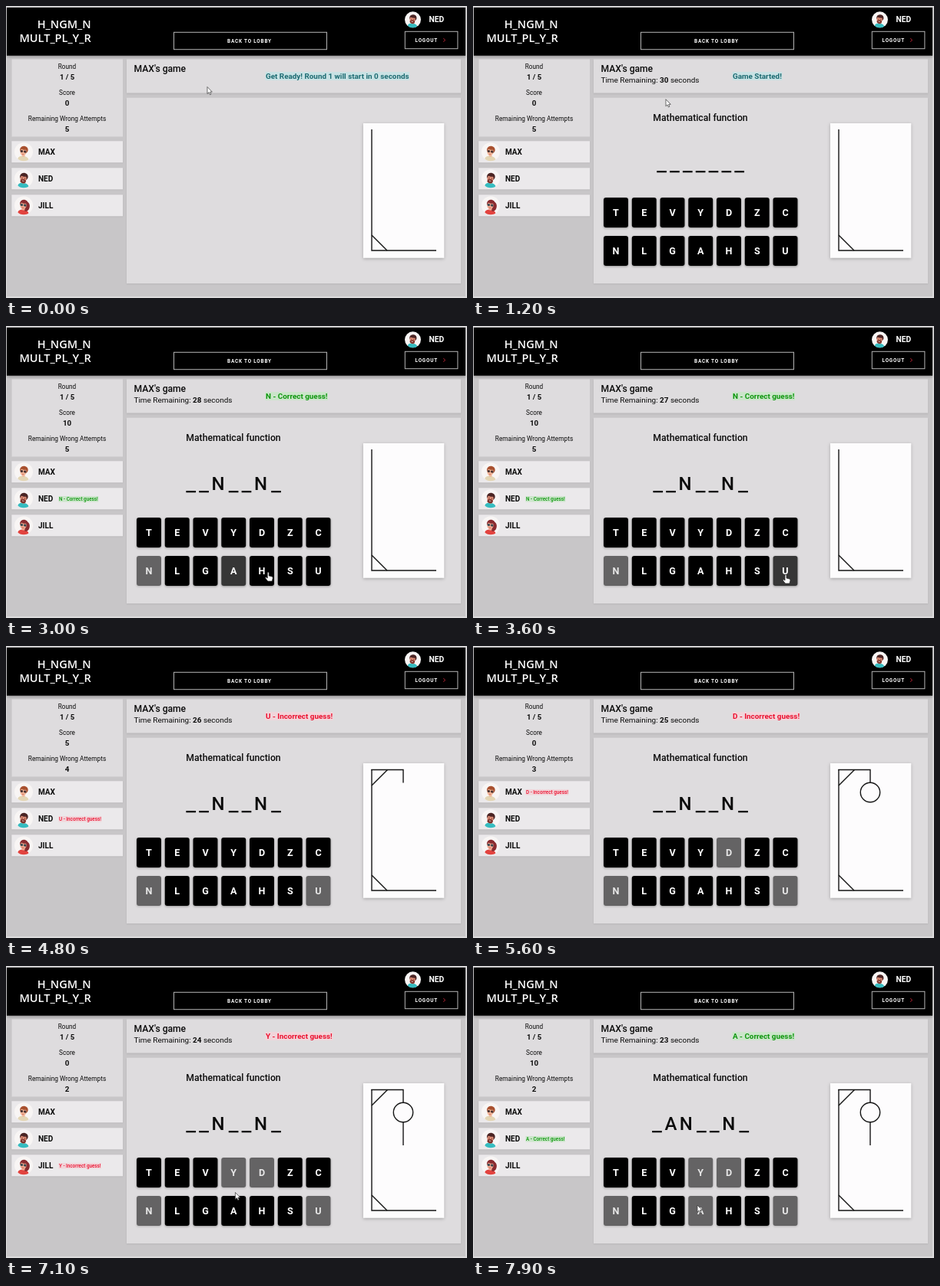
An HTML page with a canvas that plays this animation: 600 by 381 pixels, repeating every 8000 ms.

```html
<!DOCTYPE html>
<html lang="en">
<head>
<meta charset="utf-8">
<title>Word game</title>
<style>
  html, body { margin: 0; width: 100%; height: 100%; overflow: hidden; background: #c8c6c8; }
  canvas, svg { position: absolute; left: 0; top: 0; width: 600px; height: 381px; }
  text { font-family: Roboto, Arial, sans-serif; white-space: pre; }
</style>
</head>
<body>
<canvas id="stage" width="600" height="381"></canvas>
<svg id="labels" viewBox="0 0 600 381"></svg>
<script>
const ctx = document.getElementById('stage').getContext('2d');
const svg = document.getElementById('labels');
const LOOP = 8, START = 0.55;
const PANEL = '#dedcde';
const PLAYERS = ['MAX', 'NED', 'JILL'];
const KEYS = [...'TEVYDZCNLGAHSU'];
const ANSWER = 'TANGENT';
const TONES = {
  info: ['#1b6a71', '#c9e2e4'],
  good: ['#0c960c', '#cbe5ca'],
  bad: ['#ec0f2e', '#f1d5da']
};
// time, letter, player, correct
const GUESSES = [
  [2.3, 'N', 1, true],
  [3.9, 'U', 1, false],
  [5.2, 'D', 0, false],
  [6.3, 'Y', 2, false],
  [7.5, 'A', 1, true]
];
const PATHS = [
  [[0, 262, 105.5], [0.6, 262, 105.5], [1.2, 251, 121.5], [1.8, 241, 246], [2.15, 187, 322],
   [2.5, 187, 322], [3, 341, 321], [3.25, 407, 324], [4.4, 407, 324]],
  [[6.8, 318, 245], [7.2, 292, 312], [8, 292, 312]]
];

const clamp = v => Math.max(0, Math.min(1, v));
const lerp = (a, b, k) => a + (b - a) * k;

// ---------- text ----------
function make(tag, attrs) {
  const el = document.createElementNS('http://www.w3.org/2000/svg', tag);
  for (const k in attrs) el.setAttribute(k, attrs[k]);
  svg.appendChild(el);
  return el;
}

function label(x, y, size, str = '', weight = 400, anchor = 'start', fill = '#0b0b0b') {
  const el = make('text', { x, y, 'font-size': size, 'font-weight': weight, 'text-anchor': anchor, fill });
  el.textContent = str;
  return el;
}

function put(el, str) {
  if (el.textContent !== str) el.textContent = str;
}

for (const [y, str] of [[29, 'H_NGM_N'], [47.2, 'MULT_PL_Y_R']]) {
  label(110.7, y, 14.5, str, 600, 'end', '#fff').style.fontFamily = '"Open Sans", sans-serif';
}
label(288, 47.7, 6.4, 'BACK TO LOBBY', 700, 'start', '#fff').setAttribute('letter-spacing', 0.8);
label(532.6, 46.5, 6.4, 'LOGOUT', 700, 'start', '#fff').setAttribute('letter-spacing', 0.8);
label(550.5, 21, 10.3, PLAYERS[1], 700, 'start', '#fff');
label(79.5, 82.4, 8.2, 'Round', 400, 'middle');
label(79.5, 96, 9.5, '1 / 5', 700, 'middle');
label(79.5, 116.4, 8.2, 'Score', 400, 'middle');
const score = label(79.5, 130, 9.8, '0', 700, 'middle');
label(79.5, 149.7, 8.3, 'Remaining Wrong Attempts', 400, 'middle');
const lives = label(79.5, 163.7, 9.8, '5', 700, 'middle');
PLAYERS.forEach((name, i) => label(42, 193.6 + 35 * i, 10, name, 700));
label(166.5, 86.4, 12.1, PLAYERS[0] + "'s game", 500);

const timer = label(166.5, 100, 9.95);
timer.append('Time Remaining: ');
const secs = document.createElementNS(timer.namespaceURI, 'tspan');
secs.setAttribute('font-weight', 700);
timer.append(secs, ' seconds');

const notice = label(338, 95, 9.9, '', 600);
const tag = label(69, 0, 6.3, '', 500);
const hint = label(296, 149.6, 12.2, 'Mathematical function', 500, 'middle');
const keyX = i => 170 + 36.75 * (i % 7);
const keyY = i => i < 7 ? 250 : 300;
const caps = KEYS.map((k, i) => label(keyX(i) + 16, keyY(i) + 24.2, 12.6, k, 700, 'middle', '#fff'));
const slots = [...ANSWER].map(() => label(0, 213.8, 24, '', 500));

const arrow = make('path', {
  d: 'M0 0V9L2 7.1L3.4 10.2L4.8 9.6L3.6 6.6H6.3Z', fill: '#fff', stroke: '#333', 'stroke-width': 0.7
});
const hand = make('path', {
  d: 'M-1 1Q0 -1 1 1V5L5 6Q6.2 6.5 6 8L5 12H-.5L-3.6 8Q-4 6.5 -2.7 6.7L-1 8Z',
  fill: '#fff', stroke: '#222', 'stroke-width': 0.7
});

// ---------- shapes ----------
function rect(x, y, w, h, fill) {
  ctx.fillStyle = fill;
  ctx.fillRect(x, y, w, h);
}

function disc(x, y, r, fill, ry = r) {
  ctx.fillStyle = fill;
  ctx.beginPath();
  ctx.ellipse(x, y, r, ry, 0, 0, 7);
  ctx.fill();
}

function line(...p) {
  ctx.beginPath();
  for (let i = 0; i < p.length; i += 2) ctx.lineTo(p[i], p[i + 1]);
  ctx.stroke();
}

function raised(x, y, w, h, fill, blur = 2, alpha = 0.08, radius = 0) {
  ctx.save();
  ctx.shadowColor = `rgba(0,0,0,${alpha})`;
  ctx.shadowBlur = blur;
  ctx.shadowOffsetY = 1;
  ctx.fillStyle = fill;
  ctx.beginPath();
  ctx.roundRect(x, y, w, h, radius);
  ctx.fill();
  ctx.restore();
}

const FACES = [
  { hair: '#a8502f', skin: '#f2b698', shirt: '#e3d5b4', shades: '#4a3230' },
  { hair: '#4b2524', skin: '#df8c74', shirt: '#35bcc0', beard: '#7c332b' },
  { hair: '#8a2c30', skin: '#f0a88f', shirt: '#e2433f', shades: '#3a4a52', long: true }
];

function avatar(x, y, r, f) {
  ctx.save();
  disc(x, y, r, '#f8f5f4');
  ctx.clip();
  ctx.translate(x, y);
  ctx.scale(r / 13.5, r / 13.5);
  ctx.rotate(0.15);
  disc(1, 11, 8, f.shirt, 5);
  if (f.long) disc(4, 1, 5, f.hair, 7);
  rect(-1.5, 3, 4, 4, f.skin);
  disc(0, -3, 6, f.hair, 5.5);
  disc(-0.5, 0, 4.6, f.skin, 5.5);
  if (f.beard) {
    disc(-0.3, 3.7, 4.2, f.beard, 3);
    rect(-2, 2.8, 3, 1, '#f5e3dc');
    rect(-3, -1, 1.3, 1, '#3a2020');
    rect(1, -1, 1.3, 1, '#3a2020');
  }
  if (f.shades) {
    disc(-3, -0.5, 2, f.shades, 1.7);
    disc(1.9, -0.5, 2, f.shades, 1.7);
    rect(-2, 3, 2.6, 0.9, '#c25348');
  }
  disc(0, -5.2, 5, f.hair, 2.2);
  ctx.restore();
}

function page() {
  rect(0, 0, 600, 381, '#dddcdd');
  rect(1, 2, 597, 377, '#c8c6c8');
  raised(1, 2, 597, 62.7, '#000', 4, 0.3);
  ctx.strokeStyle = '#b4b4b4';
  ctx.lineWidth = 1;
  ctx.strokeRect(218.5, 34.3, 199, 22.4);
  ctx.strokeRect(519.3, 33.3, 68.6, 22.4);
  ctx.strokeStyle = '#c42436';
  line(569.3, 42.2, 571.6, 44.4, 569.3, 46.6);
  avatar(529.5, 17.8, 10.5, FACES[1]);
  raised(7.6, 69.6, 144.4, 101, PANEL, 0, 0);
  raised(157, 69.6, 435, 44, PANEL);
  raised(157, 119.7, 435, 242.3, PANEL);
  FACES.forEach((f, i) => {
    raised(7.3, 176.3 + 35 * i, 144.7, 28, '#ebe9eb');
    avatar(23, 190.3 + 35 * i, 12, f);
  });
  raised(465, 153, 105.3, 175.7, '#fdfcfd', 4, 0.25);
}

function gallows(wrong) {
  ctx.strokeStyle = '#151515';
  ctx.lineWidth = 1.4;
  line(476, 161, 476, 319, 560, 319);
  line(476, 299, 496, 319);
  if (wrong > 0) {
    line(475.3, 161.5, 517, 161.5, 517, 178.5);
    line(476, 182, 496.5, 161.5);
  }
  if (wrong > 1) {
    ctx.beginPath();
    ctx.arc(517, 191, 12.7, 0, 7);
    ctx.stroke();
  }
  if (wrong > 2) line(517, 203.7, 517, 234);
}

// ---------- motion ----------
function pointer(t) {
  for (const path of PATHS) {
    for (let i = 1; i < path.length; i++) {
      const [a, x, y] = path[i - 1], [b, u, v] = path[i];
      if (t >= a && t < b) {
        const k = (t - a) / (b - a);
        return [lerp(x, u, k), lerp(y, v, k)];
      }
    }
  }
  return null;
}

function keyAt(p) {
  return p ? KEYS.findIndex((_, i) =>
    p[0] >= keyX(i) && p[0] <= keyX(i) + 32 && p[1] >= keyY(i) && p[1] <= keyY(i) + 39) : -1;
}

function hover(i, t) {
  for (let s = 0; s < 8; s++) {
    if (keyAt(pointer(t - 0.1 - s * 0.015)) === i) return 1 - s / 8;
  }
  return 0;
}

function drawKeys(t, done) {
  KEYS.forEach((k, i) => {
    const g = done.find(e => e[1] === k);
    const alpha = g ? 1 - 0.45 * clamp((t - g[0]) / 0.27) : 1;
    const c = Math.round(54 * hover(i, t) * (g ? clamp(1 - (t - g[0]) / 0.2) : 1));
    const box = [keyX(i), keyY(i), 32, 39];
    raised(...box, PANEL, 3, 0.35 * alpha, 3);
    ctx.globalAlpha = alpha;
    raised(...box, `rgb(${c},${c},${c})`, 0, 0, 3);
    ctx.globalAlpha = 1;
    caps[i].setAttribute('opacity', lerp(0.85, 1, (alpha - 0.55) / 0.45));
  });
}

function drawWord(done) {
  const shown = [...ANSWER].map(c => done.some(e => e[3] && e[1] === c) ? c : '');
  const widths = shown.map(c => c === 'N' ? 21.7 : c ? 19.4 : 16.85);
  let x = 297.7 - widths.reduce((a, b) => a + b) / 2;
  shown.forEach((c, i) => {
    put(slots[i], c);
    slots[i].setAttribute('x', x);
    if (!c) rect(x + 0.5, 215, 12.7, 2.3, '#0b0b0b');
    x += widths[i];
  });
}

function flash(el, str, tone, x, y, h) {
  put(el, str);
  const [ink, back] = TONES[tone];
  el.setAttribute('fill', ink);
  rect(x - 0.5, y, el.getComputedTextLength() + 1, h, back);
}

function draw(t) {
  const on = t >= START;
  const done = GUESSES.filter(e => t >= e[0]);
  const wrong = done.filter(e => !e[3]).length;
  const last = done[done.length - 1];

  page();
  gallows(wrong);
  put(score, String(done.reduce((s, e) => Math.max(0, s + (e[3] ? 10 : -5)), 0)));
  put(lives, String(5 - wrong));
  put(secs, String(30 - Math.max(0, Math.floor(t - START))));
  for (const el of [timer, hint, ...caps, ...slots]) el.style.display = on ? '' : 'none';
  if (on) {
    drawKeys(t, done);
    drawWord(done);
  }

  if (last) {
    const text = `${last[1]} - ${last[3] ? 'Correct' : 'Incorrect'} guess!`;
    const tone = last[3] ? 'good' : 'bad';
    const y = 190.5 + 35 * last[2];
    flash(notice, text, tone, 338, 86, 11);
    tag.setAttribute('y', y + 2.3);
    flash(tag, text, tone, 69, y - 3.5, 7.5);
  } else {
    flash(notice, on ? 'Game Started!' : 'Get Ready! Round 1 will start in 0 seconds', 'info', 338, 86, 11);
    put(tag, '');
  }

  const p = pointer(t);
  const k = on ? keyAt(p) : -1;
  const active = k >= 0 && !done.some(e => e[1] === KEYS[k]);
  for (const [el, show] of [[arrow, p && !active], [hand, p && active]]) {
    el.style.display = show ? '' : 'none';
    if (show) el.setAttribute('transform', `translate(${p[0]} ${p[1]})`);
  }
}

const begin = performance.now();
function frame() {
  draw((performance.now() - begin) / 1000 % LOOP);
  requestAnimationFrame(frame);
}
frame();
</script>
</body>
</html>
```
